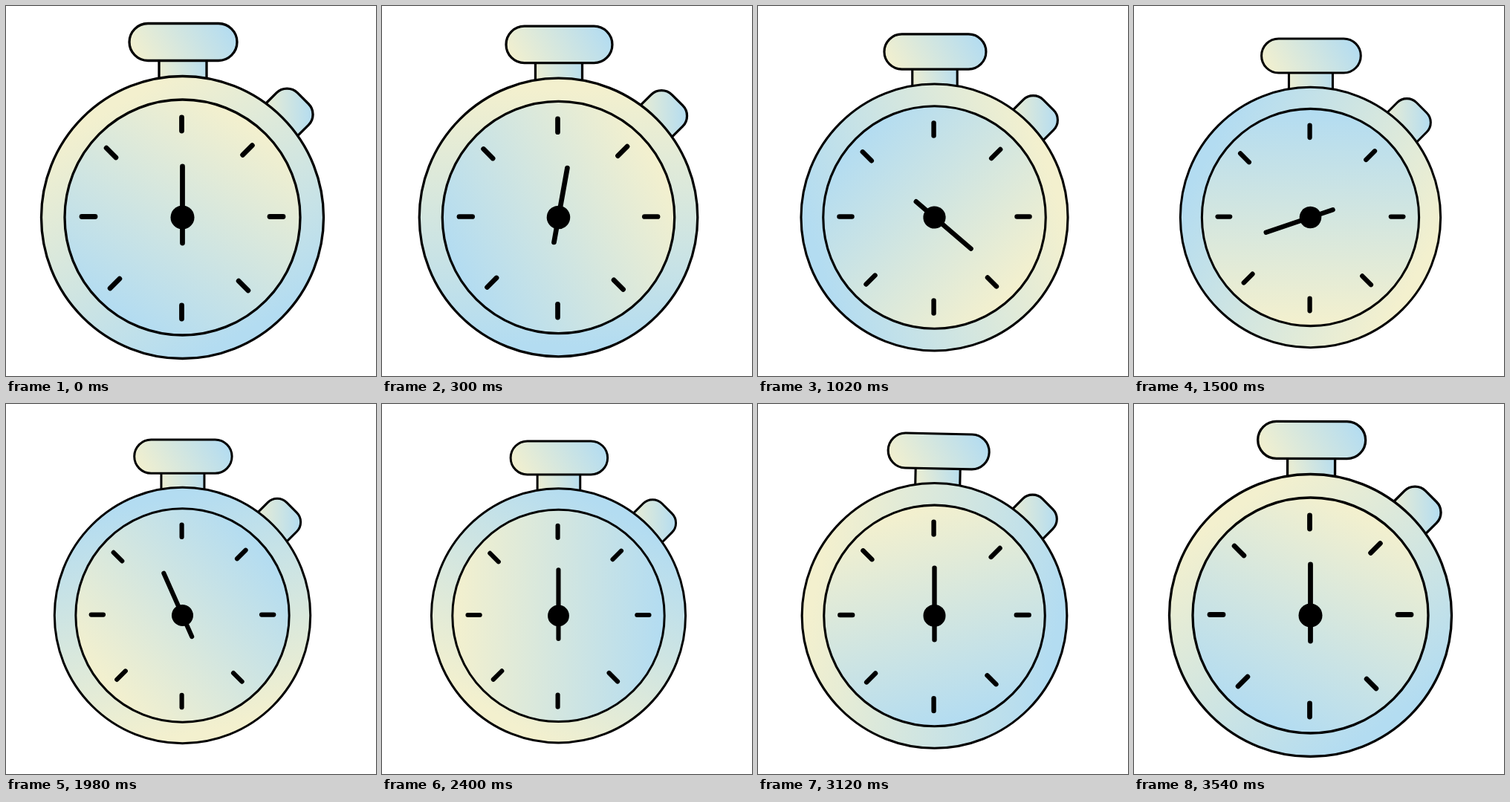
Recreate the animation shown at these times as an HTML page. Size 498x498 px, loop 3600 ms.

```html
<!DOCTYPE html>
<html lang="en">
<head>
<meta charset="utf-8">
<title>Stopwatch</title>
<style>
  html, body { margin: 0; width: 100%; height: 100%; overflow: hidden; background: #fff; }
  svg { display: block; width: 498px; height: 498px; }
  .line { stroke: #000; stroke-width: 3.3; }
  .mark { stroke: #000; stroke-width: 6.8; stroke-linecap: round; }
</style>
</head>
<body>
<svg viewBox="0 0 498 498">
  <defs>
    <linearGradient id="tint">
      <stop offset="0" stop-color="#f3f0ce"/>
      <stop offset="1" stop-color="#b3dcf1"/>
    </linearGradient>
    <linearGradient id="ringFill" href="#tint" gradientUnits="userSpaceOnUse" x1="0" y1="-175" x2="0" y2="175"/>
    <linearGradient id="dialFill" href="#tint" gradientUnits="userSpaceOnUse" x1="0" y1="-155" x2="0" y2="155"/>
    <linearGradient id="capFill" href="#tint" gradientUnits="userSpaceOnUse" x1="-58" y1="-202" x2="58" y2="-270"/>
    <linearGradient id="neckFill" href="#tint" gradientUnits="userSpaceOnUse" x1="-38" y1="-188" x2="38" y2="-207"/>
    <linearGradient id="buttonFill" href="#tint" gradientUnits="userSpaceOnUse" x1="-30" y1="-168" x2="26" y2="-224"/>
  </defs>
  <g id="watch">
    <g id="cap" class="line">
      <rect x="-31.5" y="-215" width="64" height="40" fill="url(#neckFill)"/>
      <rect x="-71.5" y="-261" width="145" height="50" rx="25" fill="url(#capFill)"/>
    </g>
    <rect class="line" x="-29" y="-228" width="61" height="61" rx="20" transform="rotate(45)" fill="url(#buttonFill)"/>
    <circle class="line" r="190" fill="url(#ringFill)"/>
    <circle class="line" r="158.5" fill="url(#dialFill)"/>
    <g id="ticks" class="mark"></g>
    <g id="hand">
      <line class="mark" y1="-68.5" y2="34.5"/>
      <circle r="16"/>
    </g>
  </g>
</svg>
<script>
const LOOP = 3600, STEP = 60;
const $ = id => document.getElementById(id);
const clamp = v => Math.min(1, Math.max(0, v));

// x, y and direction of each hour mark
const ticks = [
  [-1, -125.5, 0], [87.5, -90.5, 45], [126.5, -1, 90], [82, 92, 135],
  [-1, 127.5, 0], [-91, 89, 45], [-126.5, -1, 90], [-96, -87, 135]
];
$('ticks').innerHTML = ticks.map(([x, y, a]) =>
  `<line y1="-9" y2="9" transform="translate(${x} ${y}) rotate(${a})"/>`).join('');

function bezier(x1, y1, x2, y2) {
  const at = (a, b, u) => 3 * (1 - u) ** 2 * u * a + 3 * (1 - u) * u * u * b + u ** 3;
  return p => {
    if (p <= 0 || p >= 1) return clamp(p);
    let lo = 0, hi = 1;
    for (let i = 0; i < 24; i++) {
      const mid = (lo + hi) / 2;
      if (at(x1, x2, mid) < p) lo = mid; else hi = mid;
    }
    return at(y1, y2, lo);
  };
}
const sweep = bezier(.42, 0, .58, 1);
const shrink = bezier(.25, .25, .58, 1);
const grow = bezier(.42, 0, .75, .75);

const set = (id, value, attr = 'transform') => $(id).setAttribute(attr, value);

function draw(t) {
  const depth = t < 2610 ? shrink(t / 2520) : 1 - grow((t - 2610) / 930);
  const scale = 1 - .1 * depth;
  // sharp knocks while the alarm rings
  const dip = t < 2400 ? 0 : 10.5 * (1 - t % 180 / 180) ** 8;
  const tilt = t < 2760 ? 0 : 6.8 * Math.exp((2760 - t) / 210);

  set('watch', `translate(237.5 ${284.5 + dip}) scale(${scale})`);
  set('cap', `rotate(${tilt})`);
  set('hand', `rotate(${360 * sweep((t - 14) / 2400)})`);
  set('dialFill', `rotate(${31 + t / 10})`, 'gradientTransform');
  set('ringFill', `rotate(${t / 10 - 29})`, 'gradientTransform');
}

const start = performance.now();
function tick() {
  const t = (performance.now() - start) % LOOP;
  draw(Math.floor(t / STEP) * STEP);
  requestAnimationFrame(tick);
}
tick();
</script>
</body>
</html>
```
